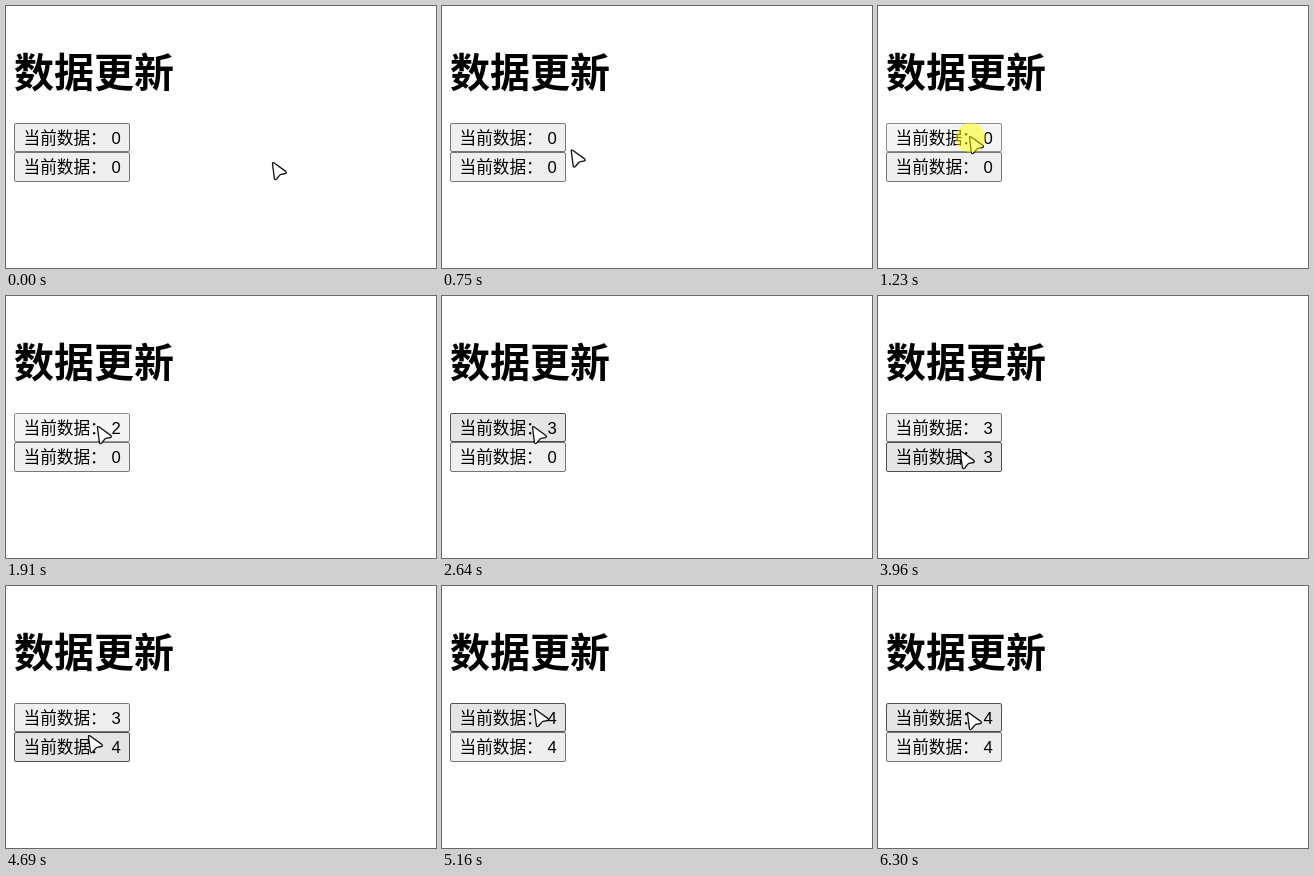
An HTML page that plays this animation: 430x262 px, repeating every 6.63 s.

```html
<!DOCTYPE html>
<html lang="zh-CN">
<head>
<meta charset="utf-8">
<title>数据更新</title>
<style>
  html, body { margin: 0; width: 100%; height: 100%; overflow: hidden; background: #fff; }
  svg { display: block; width: 430px; height: 262px; }
  text { fill: #000; white-space: pre; }
  .title { font: 700 40px "Noto Sans CJK SC", "Noto Sans CJK", sans-serif; }
  .btn text { font: 350 16.667px "Liberation Sans", "Noto Sans CJK SC", "Noto Sans CJK", sans-serif; }
  .btn rect { fill: #efefef; stroke: #767676; }
  .btn.hover rect { fill: #e5e5e5; stroke: #4f4f4f; }
  .btn.down rect { fill: #f5f5f5; stroke: #8d8d8d; }
</style>
</head>
<body>
<svg viewBox="0 0 430 262">
  <text class="title" x="8" y="81">数据更新</text>
  <g class="btn">
    <rect x="8.5" y="117.5" width="115" height="28" rx="1.5"/>
    <text x="17.5" y="138">当前数据： <tspan>0</tspan></text>
  </g>
  <g class="btn">
    <rect x="8.5" y="146.5" width="115" height="29" rx="1.5"/>
    <text x="17.5" y="167">当前数据： <tspan>0</tspan></text>
  </g>
  <g id="pointer">
    <path d="M.5 1.6Q.5 0 1.8 .8L13.8 9.4Q15.2 10.8 13.6 11.5L9 12.4Q8.2 12.6 7.6 13.3L4.6 17Q3 18.4 2.4 16.6Z"
      fill="#fff" stroke="#111" stroke-width="1.3" stroke-linejoin="round"/>
    <circle id="halo" cx="1.5" cy="1.5" r="15" fill="#ff0" fill-opacity=".5"/>
  </g>
</svg>
<script>
  const LOOP = 6630;
  const STEP = 68;   // pointer position refresh, ms
  const GLOW = 50;   // press to halo
  const HOLD = 120;  // press to release

  // key points of the pointer: first step, last step, x, y
  const hops = [
    [330, 950, 91, 130],
    [2640, 2890, 82, 155],
    [4690, 4690, 82, 149],
    [4760, 4960, 92, 123],
    [6220, 6300, 89, 126]
  ];

  const presses = [
    [1180, 1690, 1910, 5040],
    [3300, 3560, 3840, 4160]
  ];

  const buttons = [...document.querySelectorAll('.btn')];
  const pointer = document.getElementById('pointer');
  const halo = document.getElementById('halo');
  const smooth = p => p * p * (3 - 2 * p);

  // x eases in and out, y follows late
  function pointerAt(t) {
    let x = 266, y = 156;
    for (const [from, to, endX, endY] of hops) {
      if (t < from) break;
      const steps = Math.round((to - from) / STEP) + 1;
      const done = Math.min(steps, Math.floor((t - from) / STEP) + 1);
      const k = smooth(done / steps);
      x += (endX - x) * k;
      y += (endY - y) * k ** 3;
    }
    return [x, y];
  }

  function draw(t) {
    const [x, y] = pointerAt(t);
    pointer.setAttribute('transform', `translate(${x} ${y})`);

    const over = x < 124 ? (y < 146 ? 0 : 1) : -1;
    buttons.forEach((btn, i) => {
      const down = presses[i].some(p => t >= p && t < p + HOLD);
      const count = presses[i].filter(p => t >= p + HOLD).length;
      btn.classList.toggle('hover', over === i);
      btn.classList.toggle('down', down);
      btn.querySelector('tspan').textContent = count;
    });

    const lit = presses.flat().some(p => t >= p + GLOW && t < p + HOLD);
    halo.setAttribute('visibility', lit ? 'visible' : 'hidden');
  }

  const begin = performance.now();
  function tick() {
    draw((performance.now() - begin) % LOOP);
    requestAnimationFrame(tick);
  }
  draw(0);
  requestAnimationFrame(tick);
</script>
</body>
</html>
```
